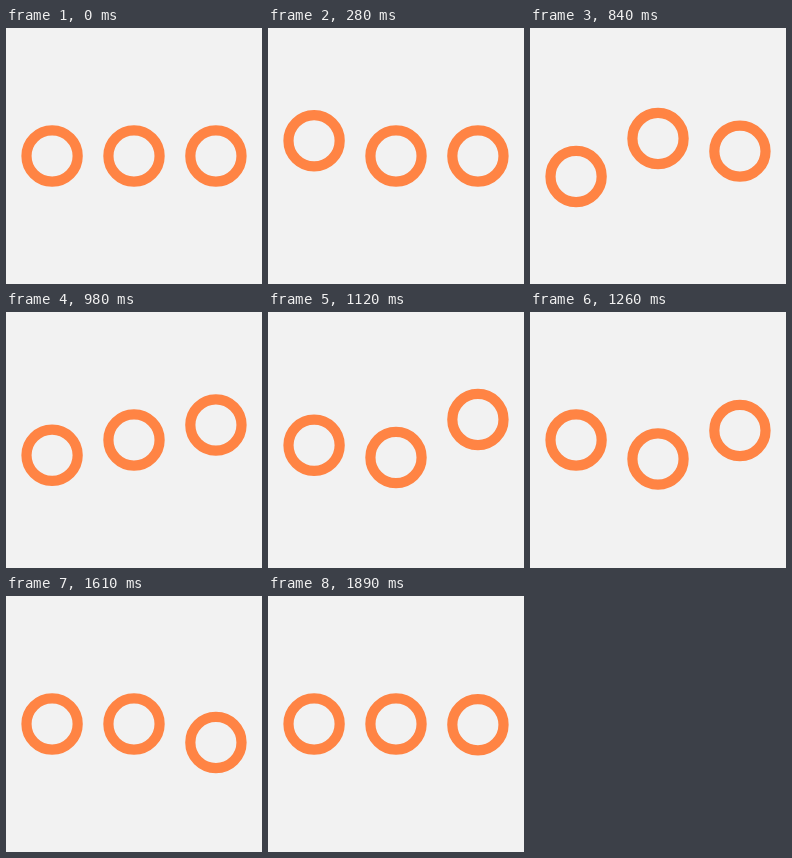
These frames come from a looping animation (256 px wide and 256 px high, 1.96 s). An HTML page:

```html
<!DOCTYPE html>
<html lang="en">
<head>
<meta charset="utf-8">
<title>Bouncing rings</title>
<style>
  html, body { margin: 0; width: 100%; height: 100%; overflow: hidden; background: #f2f2f2; }
  svg { display: block; width: 100%; height: 100%; }
  circle { fill: none; stroke: #ff8444; stroke-width: 10.24; }
</style>
</head>
<body>
<svg viewBox="0 0 256 256">
  <circle cx="46.08" cy="128" r="25.6"/>
  <circle cx="128" cy="128" r="25.6"/>
  <circle cx="209.92" cy="128" r="25.6"/>
</svg>
<script>
const LOOP = 1960, TICK = 70, REST = 128, SWING = 20.48;
const stops = [0, -SWING, SWING, 0];
const timing = [
  { start: 0, leg: 420 },
  { start: 350, leg: 420 },
  { start: 710, leg: 410 }
];
const rings = document.querySelectorAll('circle');
const ease = x => x * x * (3 - 2 * x);

// Each ring rises, dips and returns in three eased legs of equal length.
function offset(time, { start, leg }) {
  const p = (time - start) / leg;
  if (p <= 0 || p >= 3) return 0;
  const i = Math.floor(p);
  return stops[i] + (stops[i + 1] - stops[i]) * ease(p - i);
}

const begin = performance.now();

function draw(now) {
  const elapsed = Math.max(0, now - begin) % LOOP;
  const time = Math.floor(elapsed / TICK) * TICK;
  rings.forEach((ring, i) => ring.setAttribute('cy', REST + offset(time, timing[i])));
  requestAnimationFrame(draw);
}
draw(begin);
</script>
</body>
</html>
```
